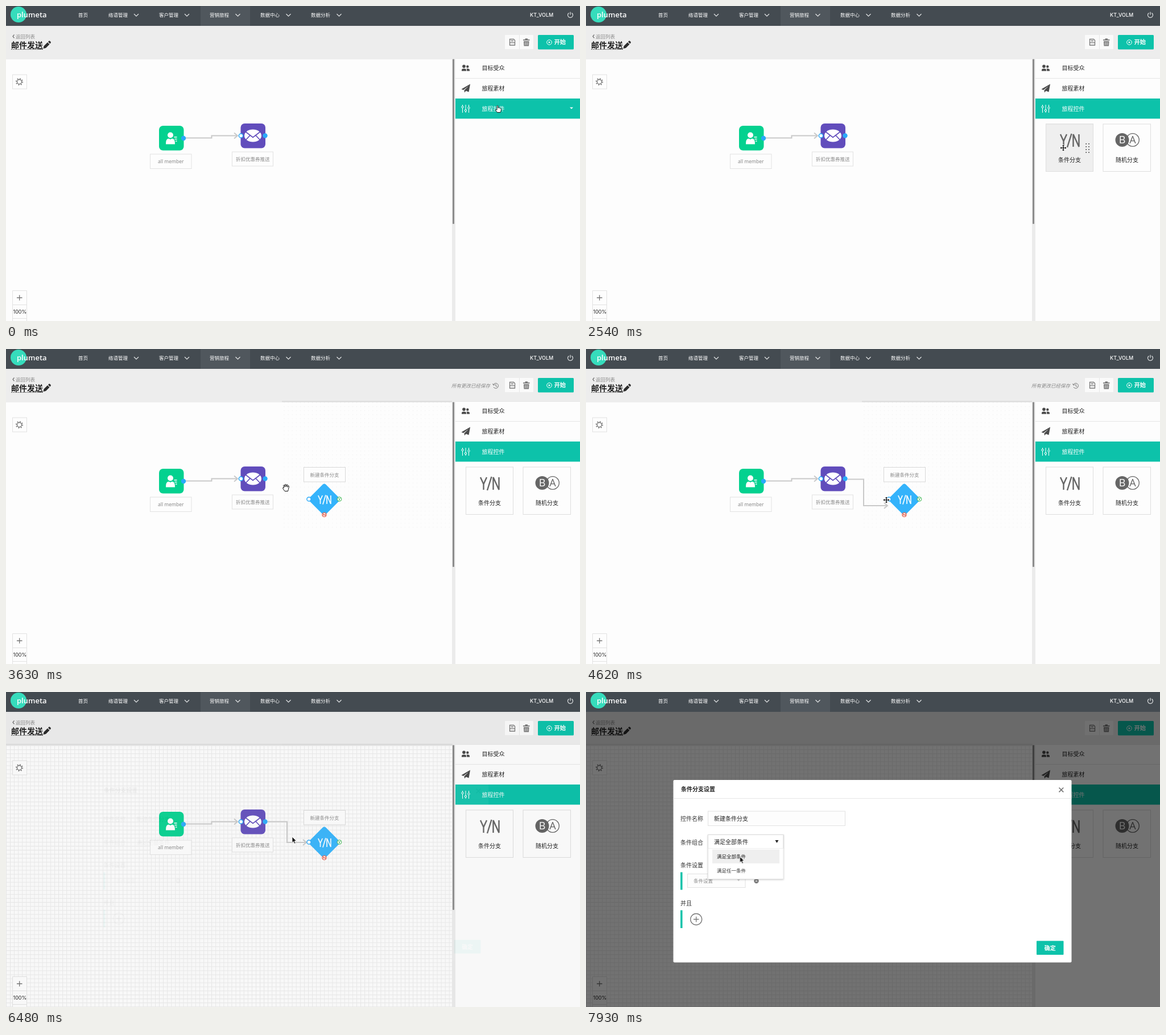
Recreate the animation shown at these times as an HTML page. Size 1009 by 555 pixels, loop 8000 ms.

```html
<!DOCTYPE html>
<html lang="zh-CN">
<head>
<meta charset="utf-8">
<title>Journey editor</title>
<style>
html, body { margin: 0; width: 100%; height: 100%; overflow: hidden; background: #fdfdfd; }
svg { display: block; width: 1009px; height: 555px; }
text { font-family: "Noto Sans CJK SC", "Noto Sans CJK", "Noto Sans", sans-serif; font-size: 10px; fill: #333; }
.s { font-size: 8.5px; }
.b { font-weight: 700; }
.m { font-weight: 500; fill: #222; }
.g { fill: #888; }
.w { fill: #fff; }
.line { fill: none; stroke: #c9c9c9; stroke-width: 2; }
.box { fill: #fdfdfd; stroke: #e2e2e2; }
.ico { fill: none; stroke: #777; stroke-width: 1.3; }
.port { fill: #fff; stroke: #2aa9fa; stroke-width: 1.5; }

/* Every change is a hard step: keyframe % = ms / 80 */
.t { animation: 8s step-end infinite; }
.caret { animation-name: caret; }
.cardA { animation-name: cardA; }
.cardB { animation-name: cardB; }
.hover { animation-name: hover; }
.ghost { animation-name: ghost; }
.node { animation-name: node; }
.saved { animation-name: saved; }
.link { animation-name: link; }
.grid { animation-name: grid; }
.shade { animation-name: shade; }
.modal { animation-name: modal; transform-origin: 503px 316px; }
.ready { animation-name: ready; }
.menu { animation-name: menu; }
.cursor { animation-name: cursor; }
.point { animation-name: point; }
.move { animation-name: move; }
.hand { animation-name: hand; }
.arrow { animation-name: arrow; }

@keyframes caret { 0% { opacity: 1 } 14.875% { opacity: 0 } }
@keyframes cardA { 0% { opacity: 0 } 19.375% { opacity: .6 } 22.375% { opacity: 1 } }
@keyframes cardB { 0% { opacity: 0 } 14.875% { opacity: .35 } 19.375% { opacity: .7 } 22.375% { opacity: 1 } }
@keyframes hover { 0% { opacity: 0 } 28% { opacity: 1 } 43.125% { opacity: 0 } }
@keyframes ghost {
  0% { opacity: 0; transform: none }
  33.5% { opacity: .5; transform: translate(-24px, 1px) }
  35.375% { opacity: .5; transform: translate(-94px, 6px) }
  37.25% { opacity: .5; transform: translate(-174px, 15px) }
  39.125% { opacity: .5; transform: translate(-239px, 24px) }
  40.875% { opacity: .5; transform: translate(-277px, 30px) }
  43.125% { opacity: 0 }
}
@keyframes node { 0% { opacity: 0 } 43.125% { opacity: 1 } }
@keyframes saved { 0% { opacity: 0 } 43.125% { opacity: 1 } 66.25% { opacity: 0 } }
@keyframes link {
  0% { opacity: 0; d: path("M460 229H467V240H476") }
  51% { opacity: 1; d: path("M460 229H467V242H476") }
  52.875% { opacity: 1; d: path("M460 229H477V260H501") }
  54.75% { opacity: 1; d: path("M460 229H485V272H521") }
  57.75% { opacity: 1; d: path("M460 229.500H488V276H530") }
  66.25% { opacity: 1; d: path("M460 228.500H494V265H528") }
}
@keyframes grid { 0% { opacity: 0 } 79.125% { opacity: 1 } }
@keyframes shade { 0% { opacity: 0 } 79.125% { opacity: .006 } 81% { opacity: .02 } 85.5% { opacity: .55 } }
@keyframes modal {
  0% { opacity: 0; transform: scale(.985) }
  81% { opacity: .05; transform: scale(.985) }
  85.5% { opacity: 1; transform: none }
}
@keyframes ready { 0% { opacity: 0 } 91.75% { opacity: 1 } }
@keyframes menu { 0% { opacity: 0 } 95.375% { opacity: 1 } }
@keyframes cursor {
  0% { transform: translate(865.5px, 181px) }
  28% { transform: translate(858px, 207px) }
  29.875% { transform: translate(845px, 238px) }
  31.75% { transform: translate(839px, 250px) }
  33.5% { transform: translate(815px, 251px) }
  35.375% { transform: translate(745px, 256px) }
  37.25% { transform: translate(665px, 265px) }
  39.125% { transform: translate(600px, 274px) }
  40.875% { transform: translate(562px, 280px) }
  43.125% { transform: translate(540px, 260px) }
  45.375% { transform: translate(492px, 244px) }
  47.25% { transform: translate(469px, 234px) }
  49.125% { transform: translate(455px, 229px) }
  51% { transform: translate(475px, 236px) }
  52.875% { transform: translate(500px, 252px) }
  54.75% { transform: translate(520px, 263px) }
  57.75% { transform: translate(528px, 266px) }
  66.25% { transform: translate(535px, 268px) }
  68.125% { transform: translate(548px, 267px) }
  70% { transform: translate(556px, 265px) }
  71.875% { transform: translate(541px, 264px) }
  73.625% { transform: translate(514px, 257px) }
  75.5% { transform: translate(503px, 255px) }
  85.5% { transform: translate(357.5px, 260.500px) }
  88.375% { transform: translate(338px, 262px) }
  91.75% { transform: translate(318px, 264px) }
  95.375% { transform: translate(306px, 267px) }
  99.125% { transform: translate(270.5px, 290px) }
}
@keyframes point { 0% { opacity: 1 } 28% { opacity: 0 } }
@keyframes move { 0% { opacity: 0 } 28% { opacity: 1 } 33.5% { opacity: 0 } 49.125% { opacity: 1 } 73.625% { opacity: 0 } }
@keyframes hand { 0% { opacity: 0 } 33.5% { opacity: 1 } 49.125% { opacity: 0 } }
@keyframes arrow { 0% { opacity: 0 } 73.625% { opacity: 1 } }
</style>
</head>
<body>
<svg viewBox="0 0 1009 555">
<defs>
  <path id="chev" d="M-4-2 0 2 4-2" fill="none" stroke="#e4e6e8" stroke-width="1.2"/>
  <path id="yn" d="M-16.500-11-11 1-5.500-11M-11 1V11M-4.500 12 3-12M6 11V-11L16 11V-11" fill="none" stroke-width="2.4"/>
  <pattern id="mesh" width="7.080" height="7.080" y="94" patternUnits="userSpaceOnUse">
    <path d="M0 .5H7.080M.5 0V7.080" stroke="#ececec"/>
  </pattern>
  <pattern id="dots" width="7.080" height="7.080" y="94" patternUnits="userSpaceOnUse">
    <rect width="1" height="1" fill="#ececec"/>
  </pattern>
  <marker id="tip" markerUnits="userSpaceOnUse" markerWidth="12" markerHeight="14" refX="8" refY="7" viewBox="0 0 12 14">
    <path d="M2 2 8 7 2 12" class="line"/>
  </marker>
  <g id="cardYN">
    <use href="#yn" x="850.5" y="237" stroke="#666"/>
    <text x="830" y="274.500" class="m">条件分支</text>
  </g>
  <filter id="soft" x="-10%" y="-10%" width="120%" height="130%"><feDropShadow dx="0" dy="1" stdDeviation="1.5" flood-opacity=".2"/></filter>
</defs>

<rect width="1009" height="555" fill="#fdfdfd"/>

<!-- canvas -->
<rect class="t node" x="485" y="94" width="299" height="226" fill="url(#dots)"/>
<rect class="t grid" y="94" width="784" height="461" fill="url(#mesh)"/>

<!-- toolbar -->
<rect y="35" width="1009" height="57" fill="#ededed"/>
<rect y="92" width="790" height="2" fill="#ededed"/>
<rect class="t node" x="485" y="91.500" width="299" height="2" fill="#dcdcdc"/>
<rect class="t grid" y="91.500" width="785" height="2" fill="#dcdcdc"/>
<path d="M14.500 50.500 12 53.500 14.500 56.500" class="ico"/>
<text x="17" y="57" class="s g">返回列表</text>
<text x="9" y="73.500" class="b" style="font-size:14px;fill:#222">邮件发送</text>
<path d="M9 76.500H66" stroke="#555" stroke-dasharray="2 1"/>
<path d="M65.500 75 66.500 70.500 73 64 76.500 67.500 70 74ZM74 63 75.500 61.500Q76.500 61 77.500 62L78.500 63Q79.500 64 78.500 65L77.300 66.500Z" fill="#2b2b2b"/>
<g class="t saved">
  <text x="783" y="68" class="s g" font-style="italic">所有更改已经保存</text>
  <path d="M856.800 63A4.500 4.500 0 1 1 857 67M855.500 61 856.800 63.800 859.500 62.800M861 62V65.300L863.500 66.500" class="ico" style="stroke-width:1"/>
</g>
<rect x="877" y="51" width="50" height="25" rx="1" fill="#fafafa"/>
<path d="M902.500 51V76" stroke="#e6e6e6"/>
<path d="M885.500 58.500H892.500L894.500 60.500V69H885.500ZM887.500 61.500H892M885.500 64.700H894.500" class="ico"/>
<path d="M909 59H920.500V60.800H909ZM912.500 57.300H917V59H912.500ZM910 62H919.500L919 70.500H910.500Z" fill="#777"/>
<path d="M912.500 63.500V69M914.800 63.500V69M917 63.500V69" stroke="#fafafa" stroke-width=".8"/>
<rect x="935" y="51" width="63" height="25.500" rx="1.500" fill="#0dc2aa"/>
<circle cx="955" cy="64" r="4.300" fill="none" stroke="#fff"/>
<path d="M953.800 62 957 64 953.800 66Z" fill="#fff"/>
<text x="963.500" y="67.300" class="b w" style="font-size:10.300px">开始</text>

<!-- canvas tools -->
<rect x="11.500" y="121" width="25" height="25" class="box"/>
<circle cx="23.500" cy="133.500" r="4" class="ico"/>
<circle cx="23.500" cy="133.500" r="5.600" class="ico" stroke-dasharray="1.600 2.800" style="stroke-width:2"/>
<path d="M11.500 555V501.500H36.500V555M11.500 526.500H36.500M11.500 550.500H36.500" class="box"/>
<path d="M19 514H28.500M23.700 509.300V518.700" class="ico"/>
<text x="12.500" y="541.800" style="font:9px Inter,sans-serif;fill:#222">100%</text>

<!-- flow -->
<path d="M316 232.500H361.500V228.500H407" class="line" marker-end="url(#tip)"/>
<rect x="269" y="211" width="43.500" height="43.500" rx="7" fill="#04d18f"/>
<circle cx="289" cy="227.500" r="5" fill="#fff"/>
<path d="M281 243.500Q280.500 234 286 233.500L289 235 292 233.500Q297.500 234 297 243.500Z" fill="#fff"/>
<path d="M295.500 231H300.500M296.500 234.500H300.500M298 238H300.500" stroke="#fff" stroke-width="1.400"/>
<circle cx="312" cy="233" r="4.200" fill="#2aa9fa"/>
<rect x="253.500" y="261" width="72.500" height="25.500" class="box"/>
<text x="267" y="276.800" class="g" style="font:8.5px 'Noto Sans','Open Sans',sans-serif">all member</text>
<rect x="412.500" y="207" width="43.500" height="43.500" rx="7" fill="#614dbc"/>
<ellipse cx="434" cy="228.500" rx="15" ry="11" fill="#fff"/>
<path d="M421 221.500 434 231.500 447 221.500M421 236.500 429 228M447 236.500 439 228" fill="none" stroke="#614dbc" stroke-width="1.700"/>
<circle cx="413" cy="228.500" r="3.600" class="port"/>
<circle cx="455.500" cy="228.500" r="4.200" fill="#2aa9fa"/>
<rect x="397.500" y="257" width="72" height="25" class="box"/>
<text x="404" y="272.800" class="s g">折扣优惠券推送</text>
<path class="line t link" d="M460 229H467V240H476" marker-end="url(#tip)"/>
<g class="t node">
  <rect x="523.500" y="208.500" width="73" height="25.500" class="box" style="stroke:#d8d8d8"/>
  <text x="534.500" y="224.500" class="s g">新建条件分支</text>
  <rect x="-20.500" y="-20.500" width="41" height="41" rx="4" transform="translate(559.500 265) rotate(45)" fill="#34b3fb"/>
  <use href="#yn" transform="translate(560 265.500) scale(.68)" stroke="#fff"/>
  <circle cx="532.500" cy="264.500" r="3.600" class="port"/>
  <circle cx="586" cy="264.500" r="3.800" fill="#fff" stroke="#35b34a"/>
  <path d="M584 262.500 586 265 588 262.500M586 265V267" fill="none" stroke="#35b34a"/>
  <circle cx="559.500" cy="292" r="3.800" fill="#fff" stroke="#e0442e"/>
  <path d="M557.800 294V290L561.200 294V290" fill="none" stroke="#e0442e"/>
</g>

<!-- side panel -->
<rect x="784" y="94" width="6" height="461" fill="#ebebeb"/>
<rect x="785" y="93.500" width="3" height="290.500" rx="1" fill="#8c8c8c"/>
<rect x="790" y="92" width="219" height="463" fill="#fdfdfd"/>
<path d="M790 92.500H1009M790 127.500H1009" stroke="#e6e6e6"/>
<rect x="790" y="163" width="219" height="35.500" fill="#0dc2aa"/>
<g fill="#4a4a4a">
  <circle cx="805" cy="106.300" r="2.800"/><circle cx="811.300" cy="106.800" r="2.200"/>
  <path d="M801 114.500V112.500Q801.500 110.300 805 110.300T809 112.500V114.500ZM810 114.500V112Q810 111 809.500 110.400 814.500 110 815 112.700V114.500Z"/>
  <path d="M800.500 146.500 816 137.500 813.500 151.500 808.500 149.500 806 152.500 805.500 148.500 813 141 804 148Z"/>
</g>
<path d="M802.500 174V188M808 174V188M813.500 174V188" stroke="#fff"/>
<g fill="#0dc2aa" stroke="#fff"><circle cx="802.500" cy="178" r="1.700"/><circle cx="808" cy="184" r="1.700"/><circle cx="813.500" cy="179.500" r="1.700"/></g>
<text x="836.500" y="113" class="m">目标受众</text>
<text x="836.500" y="149" class="m">旅程素材</text>
<text x="836.500" y="184.800" class="m w">旅程控件</text>
<path class="t caret" d="M991 178.500H997L994 181.500Z" fill="#fff"/>
<g class="t cardA">
  <rect x="808.500" y="208" width="83" height="83.500" class="box" style="stroke:#dedede"/>
  <g class="t hover">
    <rect x="808.500" y="208" width="83" height="83.500" fill="#efefef" stroke="#dedede"/>
    <path d="M879.200 242V259M884 242V259" stroke="#555" stroke-width="1.800" stroke-dasharray="1.800 3.200"/>
  </g>
  <use href="#cardYN"/>
</g>
<g class="t cardB">
  <rect x="909" y="208" width="83.500" height="83.500" class="box" style="stroke:#dedede"/>
  <circle cx="961" cy="236" r="11.300" fill="#fdfdfd" stroke="#666" stroke-width="1.300"/>
  <circle cx="942.500" cy="236" r="12" fill="#666"/>
  <g text-anchor="middle">
    <text x="942.500" y="242.200" class="w" style="font:18px 'Open Sans',sans-serif">B</text>
    <text x="961" y="242.200" style="font:18px 'Open Sans',sans-serif;fill:#666">A</text>
  </g>
  <text x="931" y="274.500" class="m">随机分支</text>
</g>
<g class="t ghost">
  <rect x="808.500" y="208" width="83" height="83.500" fill="#efefef" stroke="#dedede"/>
  <use href="#cardYN"/>
</g>

<!-- dialog -->
<rect class="t shade" y="35" width="1009" height="520"/>
<g class="t modal">
  <rect x="153.500" y="155" width="700" height="321.500" rx="2" fill="#fff"/>
  <path d="M153.500 187.500H853.500" stroke="#e6e6e6"/>
  <text x="167" y="175.300" class="b" style="fill:#222">条件分支设置</text>
  <path d="M831.500 168.500 839.300 176.300M839.300 168.500 831.500 176.300" class="ico" style="stroke-width:1.700"/>
  <text x="166" y="227">控件名称</text>
  <rect x="214.500" y="210" width="241" height="25.500" class="box"/>
  <text x="225" y="227" class="m">新建条件分支</text>
  <text x="166" y="268.500">条件组合</text>
  <rect x="214.500" y="251.500" width="132.500" height="24" class="box"/>
  <text x="225" y="267.800" class="m">满足全部条件</text>
  <path d="M332.500 261.500H338.500L335.500 266Z" fill="#ccc"/>
  <text x="166" y="309">条件设置</text>
  <path d="M167.800 317.500V348.500M167.800 384.500V416" stroke="#0dc2aa" stroke-width="3.500"/>
  <rect x="178.500" y="320.500" width="101.500" height="24" class="box"/>
  <text x="189" y="336.200" class="s g">条件设置</text>
  <path d="M265.500 329.500H271L268.200 333.500Z" fill="#ccc"/>
  <circle cx="299.500" cy="333" r="4.200" fill="#777"/>
  <path d="M298 331.500 301 334.500M301 331.500 298 334.500" stroke="#fff"/>
  <text x="166" y="376">并且</text>
  <circle cx="193.700" cy="400.500" r="10" class="ico"/>
  <path d="M189 400.500H198.400M193.700 395.800V405.200" class="ico"/>
  <rect x="792" y="438.500" width="47.500" height="24.500" rx="1" fill="#0dc2aa"/>
  <text x="805.700" y="454.800" class="b w">确定</text>
</g>
<g class="t menu">
  <rect x="214.500" y="251.500" width="132.500" height="78" fill="#fff" stroke="#e2e2e2" filter="url(#soft)"/>
  <path d="M215 275.500H346.500" stroke="#eee"/>
  <text x="225" y="267.800" class="m">满足全部条件</text>
  <rect x="222" y="277.500" width="118" height="24.500" fill="#efefef"/>
  <text x="230" y="293.300" class="s m">满足全部条件</text>
  <text x="230" y="318" class="s">满足任一条件</text>
</g>
<g class="t ready">
  <path d="M214.500 275.500V251.500H347V275.500" fill="none" stroke="#dcdcdc"/>
  <path d="M332.500 261H338.500L335.500 266Z" fill="#222"/>
</g>

<!-- header -->
<rect width="1009" height="35" fill="#444b51"/>
<rect x="342" width="87" height="35" fill="#50575d"/>
<circle cx="22" cy="15" r="14" fill="#36dcbc"/>
<text x="19" y="20" style="font:600 13px 'Open Sans',sans-serif" class="w">plumeta</text>
<text x="127" y="18.800" class="s m w">首页</text>
<text x="180" y="18.800" class="s m w">络语管理</text>
<text x="269" y="18.800" class="s m w">客户管理</text>
<text x="358" y="18.800" class="s m w">营销旅程</text>
<text x="447" y="18.800" class="s m w">数据中心</text>
<text x="536" y="18.800" class="s m w">数据分析</text>
<use href="#chev" x="229" y="16"/><use href="#chev" x="318" y="16"/><use href="#chev" x="407.500" y="16"/>
<use href="#chev" x="496.500" y="16"/><use href="#chev" x="585.500" y="16"/>
<text x="921" y="18.500" style="font:500 9px Inter,sans-serif" class="w">KT_VOLM</text>
<path d="M989.500 12.200A4.500 4.500 0 1 0 994.500 12.200M992 10.500V15.500" fill="none" stroke="#e4e6e8" stroke-width="1.200"/>

<!-- pointer -->
<g class="t cursor" stroke-linejoin="round">
  <path class="t point" fill="#fff" stroke="#111" d="M-2.500 1V-5Q-1.500-6.500-.5-5V-1.500Q.8-2.800 1.500-1.200 2.800-2 3.300-.6 5-1 5 .8V3L3.500 6.500H-2L-5 2.500Q-5.300.5-2.500 2Z"/>
  <path class="t move" fill="#111" stroke="#fff" stroke-width=".8" d="M0-6 2.600-3H1V-1H3V-2.600L6 0 3 2.600V1H1V3H2.600L0 6-2.600 3H-1V1H-3V2.600L-6 0-3-2.600V-1H-1V-3H-2.600Z"/>
  <path class="t hand" fill="#fff" stroke="#111" d="M-2 6.500-5.500 1.500Q-5.800-.5-3.500.8L-4.300-3.500Q-3.500-5.200-2.500-3.700L-1.600-1-1.800-5Q-.7-6.500.2-5L.6-1.200 1.400-4.800Q2.600-6 3.200-4.400L2.900-.6 4.200-2.800Q5.700-3.200 5.500-1.500L4.300 3.500 3.500 6.500Z"/>
  <path class="t arrow" fill="#111" stroke="#fff" stroke-width=".8" d="M0 0V10.500L2.400 8.300 4.200 12.300 6 11.500 4.300 7.600H7.500Z"/>
</g>
</svg>
</body>
</html>
```
